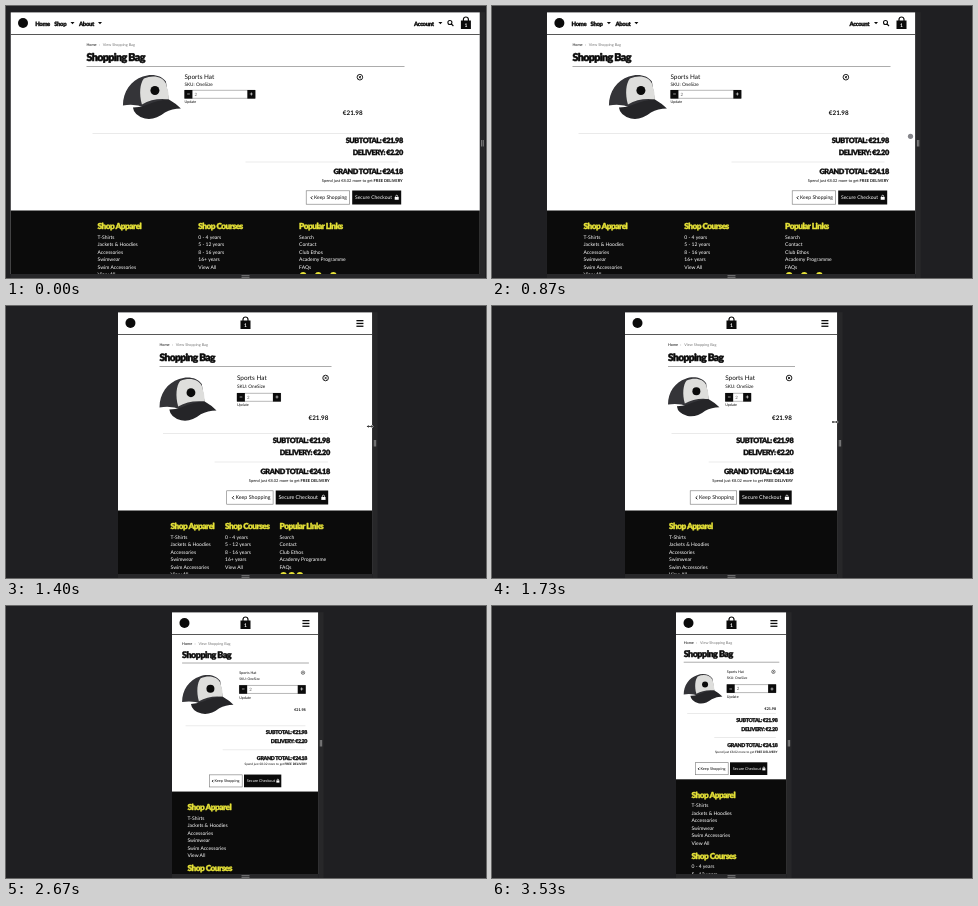
Animation, 480 px wide and 272 px high, one loop 3990 ms. Source, as an HTML page with a canvas:

```html
<!DOCTYPE html>
<html lang="en">
<head>
<meta charset="utf-8">
<title>Responsive shopping bag</title>
<style>
html, body { margin: 0; width: 100%; height: 100%; overflow: hidden; background: #1f1f22; }
canvas { display: block; width: 480px; height: 272px; }
</style>
</head>
<body>
<canvas></canvas>
<script>
const canvas = document.querySelector('canvas');
const ctx = canvas.getContext('2d');
const ratio = Math.max(1, window.devicePixelRatio || 1);
canvas.width = 480 * ratio;
canvas.height = 272 * ratio;

const LOOP = 3990, STEP = 66.65, CENTER = 239.5, TOP = 6.2;
const INK = '#0b0b0b', YELLOW = '#e6e238';

// [time, left edge of the viewport]
const EDGE = [[333, 4.5], [667, 16.5], [867, 55], [1133, 88], [1400, 112], [1733, 133],
  [1933, 144], [2200, 159], [2467, 160], [2667, 166], [3000, 172], [3533, 184]];
const CURSOR_Y = [[667, 135], [1133, 124], [1733, 116], [2200, 112]];

const FOOTER = [
  ['Shop Apparel', 'T-Shirts', 'Jackets & Hoodies', 'Accessories', 'Swimwear', 'Swim Accessories', 'View All'],
  ['Shop Courses', '0 - 4 years', '5 - 12 years', '8 - 16 years', '16+ years', 'View All'],
  ['Popular Links', 'Search', 'Contact', 'Club Ethos', 'Academy Programme', 'FAQs'],
];

function track(keys, t) {
  if (t <= keys[0][0]) return keys[0][1];
  for (let i = 1; i < keys.length; i++) {
    const [t0, a] = keys[i - 1], [t1, b] = keys[i];
    if (t < t1) return a + (b - a) * (t - t0) / (t1 - t0);
  }
  return keys[keys.length - 1][1];
}

function box(x, y, w, h, color) {
  ctx.fillStyle = color;
  ctx.fillRect(x, y, w, h);
}

function dot(x, y, r, color) {
  ctx.fillStyle = color;
  ctx.beginPath();
  ctx.arc(x, y, r, 0, 7);
  ctx.fill();
}

function stroke(d, x, y, color = INK, width = 1) {
  ctx.save();
  ctx.translate(x, y);
  ctx.strokeStyle = color;
  ctx.lineWidth = width;
  ctx.stroke(new Path2D(d));
  ctx.restore();
}

function shape(d, color) {
  ctx.fillStyle = color;
  ctx.fill(new Path2D(d));
}

function text(s, x, y, size, { color = INK, align = 'left', weight = 400, spacing = 0 } = {}) {
  ctx.font = `${weight} ${size}px Lato, sans-serif`;
  ctx.textRendering = 'geometricPrecision';
  ctx.letterSpacing = spacing * size + 'px';
  ctx.textAlign = align;
  ctx.fillStyle = color;
  ctx.fillText(s, x, y);
}

// Tight, extra heavy lettering for headings
function display(s, x, y, size, options) {
  const em = size * 1.06;
  text(s, x, y, em, { weight: 900, spacing: -.06, ...options });
  ctx.strokeStyle = ctx.fillStyle;
  ctx.lineWidth = em * .05;
  ctx.lineJoin = 'round';
  ctx.strokeText(s, x, y);
}

function caret(x) {
  shape(`M${x} 16h4l-2 2.2z`, INK);
}

function bag(x) {
  box(x - 5, 14.5, 10, 8.5, INK);
  stroke('M-2.5 0v-1.5a2.5 2.5 0 0 1 5 0v1.5', x, 15, INK, 1.2);
  text('1', x, 21, 5, { color: '#fff', align: 'center', weight: 700 });
}

function navbar(left, right, wide) {
  dot(left + 12.5, 17, 5, INK);
  if (wide) {
    display('Home', left + 24.7, 19.6, 5.6);
    display('Shop', left + 43.7, 19.6, 5.6);
    caret(left + 60);
    display('About', left + 68.5, 19.6, 5.6);
    caret(left + 87.5);
    display('Account', right - 66, 19.6, 5.6);
    caret(right - 41.5);
    stroke('M2 0a2 2 0 1 1-4 0a2 2 0 1 1 4 0M1.5 1.5l2 2', right - 30, 16.5, INK, 1.1);
    bag(right - 14);
  } else {
    bag(CENTER);
    for (let y = 14; y < 21; y += 2.8) box(right - 16, y, 7, 1.3, INK);
  }
  box(left, 28, right - left, .9, '#444');
}

function cap(x, y, width) {
  ctx.save();
  ctx.translate(x, y);
  ctx.scale(width / 58, width / 58);
  shape('M0 31C0 17 8 6 20 2C28-1 38 0 43 7L46 26L22 33Q12 29 0 31Z', '#343438');
  shape('M19 30C16 19 17 9 21 4C30 0 40 2 43 9Q46 17 46 25Q31 23 19 30Z', '#dededc');
  shape('M10 33Q16 33 22 31Q36 25 46 25Q53 29 58 34Q49 34 42 38Q32 46 22 44Q11 41 10 33Z', '#252528');
  dot(32, 16, 4.5, INK);
  ctx.restore();
}

function stepper(x, y, w) {
  ctx.strokeStyle = '#888';
  ctx.lineWidth = .6;
  ctx.strokeRect(x + .3, y + .3, w - .6, 8);
  for (const [bx, sign] of [[x, '−'], [x + w - 8, '+']]) {
    box(bx, y, 8, 8.6, INK);
    text(sign, bx + 4, y + 6.3, 6, { color: '#fff', align: 'center', weight: 700 });
  }
  text('2', x + 10, y + 6, 4.4, { color: '#666' });
}

function button(label, x, y, w, h, size, dark) {
  box(x, y, w, h, dark ? INK : '#777');
  if (!dark) box(x + .6, y + .6, w - 1.2, h - 1.2, '#fff');
  const color = dark ? '#fff' : INK;
  const base = y + h / 2 + size * .35;
  if (dark) {
    text(label, x + 2.8, base, size, { color });
    const lock = x + w - size * 1.3;
    box(lock, base - size * .45, size * .8, size * .55, color);
    stroke(`M0 0v-${size * .2}a${size * .2} ${size * .2} 0 0 1 ${size * .4} 0v${size * .2}`,
      lock + size * .2, base - size * .4, color, .7);
  } else {
    text(label, x + w - 3, base, size, { color, align: 'right' });
    const tip = x + w - 3 - ctx.measureText(label).width - size * .6;
    stroke(`M${size * .3}-${size * .6}l-${size * .3} ${size * .3}l${size * .3} ${size * .3}`, tip, base, color, .9);
  }
}

function footer(left, right, top, x, step, columns) {
  box(left, top, right - left, 272 - top, INK);
  FOOTER.forEach(([title, ...links], i) => {
    const cx = columns ? x + i * step : x;
    const y = top + 18.9 + (columns ? 0 : i * 61);
    display(title, cx, y, 7.8, { color: YELLOW });
    links.forEach((link, k) => text(link, cx, y + 9.2 + k * 7.5, 5, { color: '#fff' }));
  });
  if (columns) {
    for (let k = 0; k < 3; k++) dot(x + 2 * step + 4 + k * step * .15, top + 65, 3.4, YELLOW);
  }
}

// Measurements that change at the page breakpoints
function layout(width) {
  if (width >= 345) return { wide: true, inner: 318, dy: 0, foot: 204.5 };
  if (width >= 285) return { wide: true, inner: 269, dy: -1.5, foot: 201.2 };
  if (width >= 220) return { inner: 172, dy: 0, foot: 204.5, columns: true };
  if (width >= 165) return { inner: 127, dy: 0, foot: 204.5 };
  const shift = -.34 * (161 - width);
  return { tiny: true, inner: width * .866, dy: shift * .07, shift, foot: 190.5 + shift };
}

function page(left, right) {
  const width = right - left;
  const { wide, tiny, inner, dy, shift = 0, foot, columns } = layout(width);
  const x0 = CENTER - inner / 2, x1 = CENTER + inner / 2;
  const end = { align: 'right' };

  box(left, TOP, width, 262, '#fff');
  navbar(left, right, wide);

  const crumb = (tiny ? 39.2 : 40) + dy;
  text('Home', x0, crumb, 3.8);
  text('›', x0 + 12.3, crumb, 3.8, { color: '#777' });
  text('View Shopping Bag', x0 + 16.3, crumb, 3.8, { color: '#777' });
  display('Shopping Bag', x0, (tiny ? 52 : 55) + dy, tiny ? 8.5 : wide ? 10.1 : 9.6);
  box(x0, (tiny ? 57 : 60.3) + dy, inner, .7, '#888');

  // Bag item
  const tx = x0 + (wide ? 37.5 + inner * .19 : inner * .45);
  const itemEnd = wide ? x1 + 25.5 - inner * .212 : x1 - 3.2;
  if (wide) cap(tx - 61.5, 68.5 + dy, 58);
  else cap(x0, (tiny ? 69 : 71) + dy, Math.min(57, inner * .405));
  const name = tiny ? { y: 68, sku: 74.3, step: 79.5, update: 93, price: 105, size: 3.7, small: 3.4 }
    : wide ? { y: 73.2, sku: 80, step: 84, update: 97, price: 108.8, size: 6.4, small: 4.7 }
    : { y: 74, sku: 82, step: 87, update: 100, price: 114, size: 6.4, small: 4.7 };
  text('Sports Hat', tx, name.y + dy, name.size);
  text('SKU: OneSize', tx, name.sku + dy, name.small);
  stepper(tx, name.step + dy, tiny ? itemEnd - tx : wide ? inner * .223 : columns ? 44 : 26);
  text('Update', tx, name.update + dy, 3.7);
  text('€21.98', itemEnd, name.price + dy, tiny ? 3.7 : 6.3, { ...end, weight: 700 });
  const r = tiny ? 1.7 : 2.8;
  stroke(`M${r} 0a${r} ${r} 0 1 1-${2 * r} 0a${r} ${r} 0 1 1 ${2 * r} 0M-${r * .4}-${r * .4}l${r * .8} ${r * .8}m0-${r * .8}l-${r * .8} ${r * .8}`,
    itemEnd - 2.7, (tiny ? 67 : wide ? 71.2 : 72) + dy, INK, tiny ? .5 : .9);

  // Totals
  const total = tiny ? [124.5, 133, 142, 148.5, 158.5, 164.3] : [127, 137, 149, 155.7, 168.4, 176.3];
  const [line, sub, delivery, line2, grand, spend] = total.map(y => y + (tiny ? shift : dy));
  const size = tiny ? 5 : 6.9, tail = x1 - 1.8;
  const inset = wide ? 6 : 3.5;
  const subStart = wide ? CENTER : x0 + inner * .32;
  box(x0 + inset, line, inner - 2 * inset, .6, '#ddd');
  display('SUBTOTAL: €21.98', tail, sub, size, end);
  display('DELIVERY: €2.20', tail, delivery, size, end);
  box(subStart, line2, x1 - inset - subStart, .6, '#ddd');
  display('GRAND TOTAL: €24.18', tail, grand, size, end);
  const note = tiny ? 3.1 : 4;
  text('FREE DELIVERY', tail, spend, note, { ...end, weight: 700 });
  const bold = ctx.measureText('FREE DELIVERY ').width;
  text('Spend just €8.02 more to get', tail - bold, spend, note, end);

  // Actions
  if (tiny) {
    button('Keep Shopping', 203, 173.5 + shift, 33.5, 12.7, 3.8);
    button('Secure Checkout', 238, 173.5 + shift, 37.3, 12.7, 3.8, true);
  } else {
    const w = wide ? 49 : 52.5, kw = wide ? 44 : 47, bx = x1 - 3.3 - w;
    const label = wide ? 5 : 5.3;
    button('Keep Shopping', bx - 2.3 - kw, 184.5 + dy, kw, 14, label);
    button('Secure Checkout', bx, 184.5 + dy, w, 14, label, true);
  }

  const fx = tiny ? left + 15.5 : wide || columns ? x0 + 11 : x0 + 1;
  footer(left, right, foot, fx, inner * .317, wide || columns);
}

function draw(now) {
  const t = Math.floor((now % LOOP + 4) / STEP) * STEP;
  const left = track(EDGE, t), right = 478.4 - left;

  ctx.setTransform(ratio, 0, 0, ratio, 0, 0);
  box(0, 0, 480, 272, '#1f1f22');

  ctx.save();
  ctx.beginPath();
  ctx.rect(left, TOP, right - left, 268 - TOP);
  ctx.clip();
  page(left, right);
  ctx.restore();

  // Resize handles
  box(right, TOP, 5.2, 272 - TOP, '#272729');
  box(left, 268, right - left, 4, '#272729');
  box(right + 1.4, 134, .8, 6.5, '#999');
  box(right + 2.9, 134, .8, 6.5, '#999');
  box(235.5, 269.4, 8, .7, '#999');
  box(235.5, 270.9, 8, .7, '#999');

  const cy = track(CURSOR_Y, t);
  if (t > 390 && t < 870) dot(right - 5, cy, 2.6, '#85858a');
  else if (t > 870 && t < 2150) {
    const arrows = 'M-2.5 0h5M-1.5-1l-1 1l1 1M1.5-1l1 1l-1 1';
    stroke(arrows, right - 2.5, cy, '#fff', 1.6);
    stroke(arrows, right - 2.5, cy, '#000', .8);
  }
}

function tick() {
  draw(performance.now());
  requestAnimationFrame(tick);
}
tick();
</script>
</body>
</html>
```
